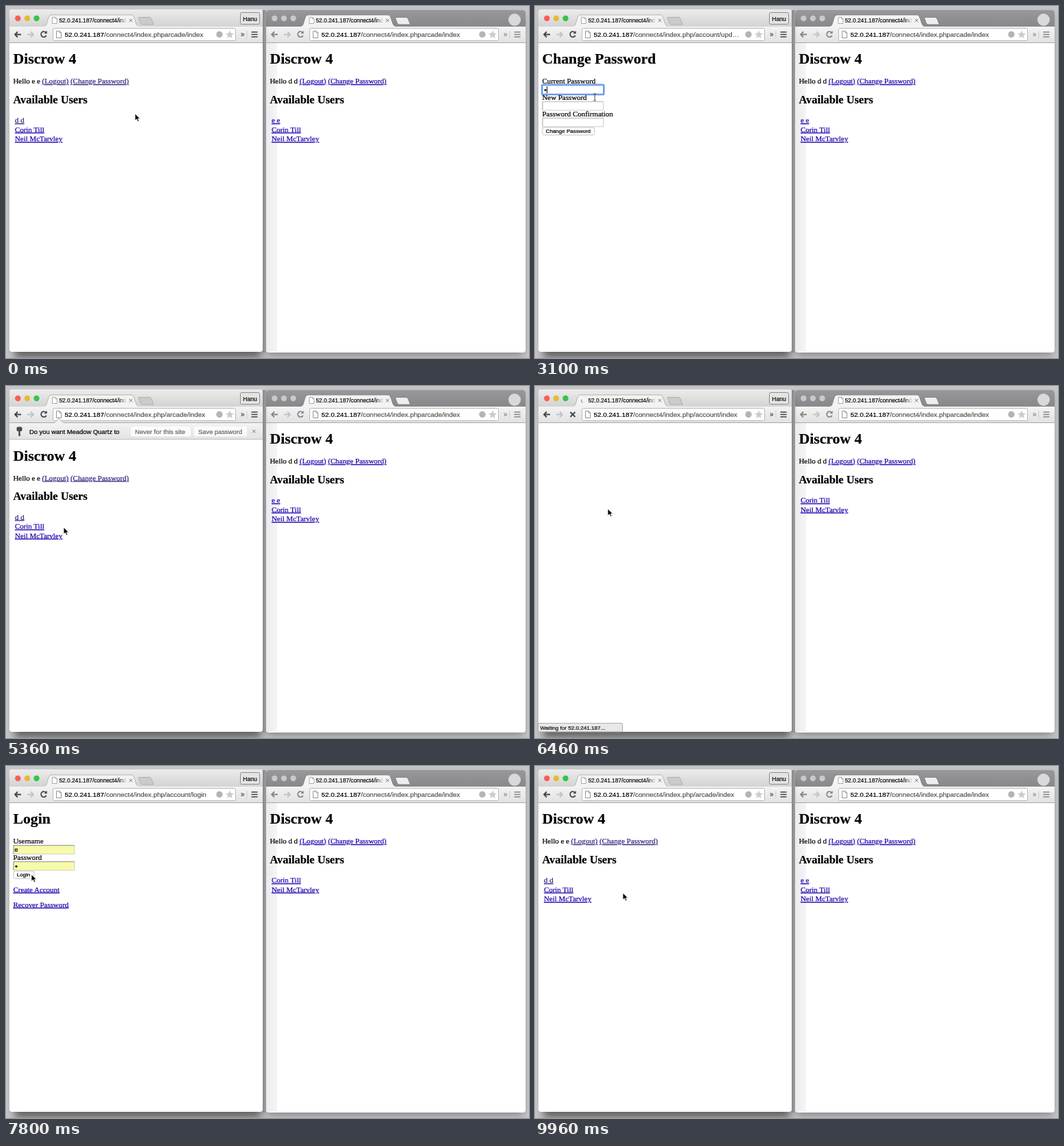
An HTML page for the animation above (10 s loop, 762x513 px).

```html
<!DOCTYPE html>
<html lang="en">
<head>
<meta charset="utf-8">
<title>Two browser windows</title>
<style>
html, body { margin: 0; width: 100%; height: 100%; overflow: hidden; background: #c6c6c8; }
svg { display: block; width: 762px; height: 513px; }
text { white-space: pre; stroke-width: .22px; }
.ui { font-family: "Liberation Sans", Arial, sans-serif; }
.doc { font-family: "Liberation Serif", Times, serif; }
.link { text-decoration: underline; }
</style>
</head>
<body>
<svg viewBox="0 0 762 513">
  <defs>
    <linearGradient id="bar" x2="0" y2="1"><stop stop-color="#ececec"/><stop offset="1" stop-color="#d3d3d3"/></linearGradient>
    <linearGradient id="dim" x2="0" y2="1"><stop stop-color="#98989b"/><stop offset="1" stop-color="#88888c"/></linearGradient>
    <linearGradient id="tool" x2="0" y2="1"><stop stop-color="#f3f3f3"/><stop offset="1" stop-color="#e2e2e2"/></linearGradient>
    <linearGradient id="fade"><stop stop-color="#f3f3f3" stop-opacity="0"/><stop offset="1" stop-color="#f3f3f3"/></linearGradient>
    <linearGradient id="spill"><stop stop-color="#ebebee"/><stop offset="1" stop-color="#f5f5f7"/></linearGradient>
    <linearGradient id="gap"><stop stop-color="#88888b"/><stop offset="1" stop-color="#9d9da0"/></linearGradient>
    <filter id="blur" x="-10%" y="-10%" width="120%" height="120%"><feGaussianBlur stdDeviation="6"/></filter>
  </defs>
  <g id="frame"></g>
  <g id="live"></g>
  <g id="arrow"><path d="M0 0v10l2.4-2.2 1.7 3.6 1.7-.8-1.6-3.4h3.2z" stroke="#fff" stroke-width=".8"/></g>
  <g id="beam" fill="none" stroke="#444"><path d="M-2-5q2 0 2 1.500V4q0 1.500-2 1.500M2-5q-2 0-2 1.500M2 5.500q-2 0-2-1.500"/></g>
</svg>
<script>
const LOOP = 10000, RIGHT = 374, WIDER = 383;
const BLUE = '#1d00ac', VISITED = '#33207e';
const $ = id => document.getElementById(id);

const rect = (x, y, w, h, fill, more = '') =>
  `<rect x="${x}" y="${y}" width="${w}" height="${h}" fill="${fill}" ${more}/>`;
const path = (d, more) => `<path d="${d}" ${more}/>`;
const dot = (x, y, r, fill) => `<circle cx="${x}" cy="${y}" r="${r}" fill="${fill}"/>`;
const ink = color => `fill="${color}" stroke="${color}"`;
const ui = (x, y, s, size, color = '#111', more = '') =>
  `<text class="ui" x="${x}" y="${y}" font-size="${size}" ${ink(color)} ${more}>${s}</text>`;
const doc = (x, y, s, size = 10.9, more = '') =>
  `<text class="doc" x="${x}" y="${y}" font-size="${size}" ${ink('#000')} ${more}>${s}</text>`;
const head = (x, y, s, size) => doc(x, y, s, size, 'font-weight="bold"');
const link = (s, color = BLUE) => `<tspan class="link" ${ink(color)}>${s}</tspan>`;
const move = (x, y, s) => `<g transform="translate(${x} ${y})">${s}</g>`;
const line = (d, color, w = 1) => path(d, `fill="none" stroke="${color}" stroke-width="${w}"`);

// Window furniture; dx moves the left parts, ex the parts tied to the right edge.
function chrome(dx, ex, active) {
  const dark = active ? '#444' : '#858585', edge = active ? '#a8a8a8' : '#77777b';
  const lights = active ? ['#fb5d57', '#e9b935', '#34c547'] : ['#c9c9cc', '#c9c9cc', '#c9c9cc'];
  const left = active ? 5 : 379, width = active ? 369 : 378;
  return move(dx, 0,
    lights.map((c, i) => dot(17.3 + i * 13.6, 18, 4.2, c)).join('') +
    path('M56 30C61 29 60 13 66 13H183C188 13 188 29 193.500 30', `fill="#f3f3f3" stroke="${edge}" stroke-width=".8"`) +
    path('M193 16.500H209Q211 16.500 212 19L215 27H199Q197 27 196 25Z',
      `fill="${active ? '#cbcbcb' : '#eeeef0'}" stroke="${edge}" stroke-width=".8"`) +
    ui(77.5, 24, '52.0.241.187/connect4/ind', 8.3) +
    rect(164, 14, 12, 14, 'url(#fade)') + rect(176, 14, 2, 14, '#f3f3f3') +
    line('M179.500 18.700l4.600 4.600m0-4.600l-4.600 4.600', '#777')) +
    rect(left, 30, width, 23.5, 'url(#tool)') + rect(left, 53, width, 1, '#a9a9a9') +
    move(dx, 0, rect(56.5, 29, 136, 2, '#f3f3f3') +
      rect(68.5, 32.5, 266 + ex - dx, 18, '#fff', 'rx="2" stroke="#b9b9b9"') +
      line('M22 41.500H13M17 37.500L13 41.500L17 45.500', dark, 1.8) +
      line('M31 41.500H40M36 37.500L40 41.500L36 45.500', '#c2c2c2', 1.8) +
      path('M73.500 36.500h4.500l2.500 2.500v7.500h-7zM78 36.500v2.500h2.500', 'fill="#fff" stroke="#888" stroke-width=".9"')) +
    move(ex, 0, dot(311, 41.5, 4.7, '#b4b4b4') +
      path('M326 35.500l1.700 4 4.300.4-3.300 2.800 1 4.300-3.700-2.300-3.700 2.300 1-4.300-3.300-2.800 4.300-.4z', 'fill="#cbcbcb"') +
      ui(342, 44.5, '»', 10, dark) + rect(350.5, 36, .8, 11, '#c5c5c5') +
      line('M357.500 38h9M357.500 41.500h9M357.500 45h9', dark, 1.7));
}

const reload = (x, color) => move(x, 0,
  line('M58.300 38.800A4 4 0 1 0 58.700 43', color, 1.7) + path('M59.700 36v4.300h-4.300z', `fill="${color}"`));

const tabIcon = x => path(`M${x} 16.500h4.500l2.300 2.300v6.700h-6.800zM${x + 4.5} 16.500v2.300h2.300`,
  'fill="#fff" stroke="#999" stroke-width=".8"');

$('frame').innerHTML =
  rect(0, 0, 762, 513, '#c6c6c8') +
  rect(380, 12, 374, 497, '#000', 'opacity=".32" filter="url(#blur)"') +
  rect(379, 6, 378, 499, '#fff', 'rx="4"') +
  path('M379 30V10q0-4 4-4H753q4 0 4 4V30z', 'fill="url(#dim)"') +
  chrome(RIGHT, WIDER, false) + dot(741, 20, 9, '#d9d9db') +
  tabIcon(442) + reload(RIGHT, '#858585') +
  rect(12, 18, 360, 495, '#000', 'opacity=".5" filter="url(#blur)"') +
  rect(374, 6, 5, 499, 'url(#gap)') +
  rect(5, 5, 369, 499, '#fff', 'rx="4"') +
  path('M5 30V9q0-4 4-4H370q4 0 4 4V30z', 'fill="url(#bar)"') +
  chrome(0, 0, true) +
  rect(341.5, 9.5, 28, 17, '#e4e4e4', 'rx="2" stroke="#8d8d8d"') +
  ui(355.5, 21.5, 'Hanu', 8.6, '#111', 'text-anchor="middle"');

// Blank page areas, repainted with every change of content.
const paper = rect(5, 54, 369, 448, '#fff') + rect(395, 54, 362, 448, '#fff') + rect(379, 54, 16, 450, 'url(#spill)');

function lobby(me, names, meColor) {
  return head(10.5, 84, 'Discrow 4', 21.7) +
    doc(10.5, 113, `Hello ${me} ${link('(Logout)', meColor)} ${link('(Change Password)', meColor)}`) +
    head(10.5, 141.5, 'Available Users', 16.35) +
    names.map((n, i) => doc(13, 170 + i * 13.5, link(n, n == 'd d' ? VISITED : BLUE))).join('');
}

function field(y, { focus, fill = '#fff', text = '', caret }) {
  return (focus ? rect(10, y - 1, 90.5, 14.5, 'none', 'rx="1.5" stroke="#6f9ff0" stroke-width="2.2"') : '') +
    rect(11, y, 88.5, 12.5, fill, `stroke="${focus ? '#5a8be0' : '#c8c8c8'}" stroke-width=".9"`) +
    (focus ? '' : line(`M11 ${y + 12.5}V${y}H99.500`, fill == '#fff' ? '#b5b5b5' : '#8f8f8f', .9)) +
    (text == '•' ? dot(15, y + 6.8, 1.6, '#111') : ui(12.5, y + 9.5, text, 8.5, '#000')) +
    (caret ? rect(text ? 17 : 12.5, y + 1.5, 1, 10, '#111') : '');
}

const button = (y, w, s) => rect(11, y, w, 11, '#fff', 'rx="2.5" stroke="#bdbdbd" stroke-width=".9"') +
  ui(15.7, y + 8, s, 8, '#000');

function passwordPage(t, caret) {
  const focus = step([[0, -1], [2040, 0], [3320, 1], [4420, 2]], t);
  const typed = [2720, 3940, 4680];
  const labels = ['Current Password', 'New Password', 'Password Confirmation'];
  return head(10.5, 84, 'Change Password', 21.7) +
    labels.map((s, i) => doc(10.5, 113 + i * 23.8, s) +
      field(115.7 + i * 23.8, { focus: focus == i, text: t >= typed[i] ? '•' : '', caret: focus == i && caret })).join('') +
    button(177, 75.5, 'Change Password');
}

function loginPage(t, caret) {
  const focus = t >= 8320 && t < 9300, empty = t >= 8460 && t < 8760;
  const yellow = '#f7fba8';
  return head(10.5, 84, 'Login', 21.7) +
    doc(10.5, 113, 'Username') + field(115.7, { fill: yellow, text: 'e' }) +
    doc(10.5, 136.8, 'Password') +
    field(139.5, { fill: t < 8460 ? yellow : '#fff', text: empty ? '' : '•', focus, caret: focus && caret }) +
    button(153, 30, 'Login') +
    doc(10.5, 183.5, link('Create Account')) + doc(10.5, 205.5, link('Recover Password'));
}

function infobar(h) {
  const pill = (x, w, s) => rect(x, 59, w, 14.5, '#fbfbfb', 'rx="2"') + ui(x + 6, 69.7, s, 9.4, '#666');
  return `<svg x="0" y="47" width="374" height="${h + 7}" viewBox="0 47 374 ${h + 7}">` +
    move(0, h - 24.5, rect(5, 54, 369, 24, 'url(#tool)') + rect(5, 77.5, 369, 1, '#b0b0b0') +
      rect(15.5, 59.5, 8, 6.5, '#4a4a4a', 'rx="2"') + rect(18.3, 64, 2.5, 9, '#4a4a4a') +
      ui(34, 69.7, 'Do you want Meadow Quartz to', 9.4, '#000') +
      pill(182, 87, 'Never for this site') + pill(274, 77, 'Save password') +
      line('M359 63.700l4.600 4.600m0-4.600l-4.600 4.600', '#777')) +
    path('M70 54L77 47.500L84 54', 'fill="#f1f1f1" stroke="#aaa" stroke-width=".8"') + '</svg>';
}

const bubble = s => s && rect(4.5, 491.5, 123, 12.5, '#e8e8e8', 'rx="1.5" stroke="#a5a5a5" stroke-width=".9"') +
  ui(7.5, 500.5, s, 8.1);

// Last value whose start time has passed.
const step = (list, t) => list.filter(k => k[0] <= t).pop()[1];

const pages = [[0, 'lobby'], [1500, 'password'], [5100, 'lobby'], [6300, 'blank'], [6760, 'login'], [9480, 'lobby']];
const urls = [[0, 'arcade/index'], [1500, '/account/upd…'], [5100, '/arcade/index'],
  [6300, '/account/index'], [6760, '/account/login'], [9480, '/arcade/index']];
const hover = '52.0.241.187/connect4/ind…', waiting = 'Waiting for 52.0.241.187...';
const notes = [[0, ''], [820, hover], [1240, waiting], [1500, ''], [6060, hover], [6280, waiting], [6760, '']];
const busy = [[0, 0], [1240, 1], [1500, 0], [4960, 1], [5140, 0], [6220, 1], [6780, 0],
  [7980, 1], [8080, 0], [9320, 1], [9500, 0]];

// Pointer stops: time, x, y.
const stops = [[0, 188, 157], [660, 188, 157], [860, 128, 108], [1400, 128, 108], [1660, 128, 123],
  [2040, 88, 122], [2920, 88, 122], [3300, 86, 145], [4060, 86, 145], [4320, 87, 167], [4720, 87, 168],
  [4900, 62, 182], [5000, 62, 182], [5360, 84, 206], [5820, 84, 206], [6080, 72, 133], [6240, 72, 133],
  [6460, 106, 179], [6840, 106, 179], [7300, 62, 192], [7780, 37, 158], [7980, 37, 158], [8300, 60, 146],
  [8840, 60, 146], [9120, 35, 158], [9340, 35, 158], [9820, 130, 188], [9940, 130, 188],
  [9960, 128, 185], [LOOP, 128, 185]];

const clamp = v => Math.max(0, Math.min(1, v));

function pointer(t) {
  const i = stops.findIndex(s => s[0] > t), [t0, x0, y0] = stops[i - 1], [t1, x1, y1] = stops[i];
  const p = (t - t0) / (t1 - t0), k = p * p * (3 - 2 * p);
  return [x0 + (x1 - x0) * k, y0 + (y1 - y0) * k];
}

function scene(t) {
  const page = step(pages, t), caret = Math.floor((t - 2020) / 240) % 2 == 0;
  const bar = 24.5 * (clamp((t - 5140) / 120) - clamp((t - 6200) / 80));
  const others = ['Corin Till', 'Neil McTarvley'];
  const body = {
    lobby: () => lobby('e e', ['d d', ...others], VISITED),
    password: () => passwordPage(t, caret),
    login: () => loginPage(t, caret),
    blank: () => ''
  }[page]();
  const online = t < 6400 || t >= 9700 ? ['e e', ...others] : others;
  const url = (x, s) => ui(x, 45, `52.0.241.187<tspan ${ink('#555')}>/connect4/index.php${s}</tspan>`, 9.85, '#000');
  const loading = step(busy, t), spin = Math.floor(t / 20) * 14 % 360;
  return paper + url(85.5, step(urls, t)) + url(459.5, 'arcade/index') +
    (loading
      ? `<g transform="rotate(${spin} 71 21)">${line('M71 17.500a3.500 3.500 0 0 1 3.500 3.500', '#7d85cc', 1.2)}</g>` +
        line('M51.500 38l7 7m0-7l-7 7', '#444', 1.9)
      : tabIcon(67.5) + reload(0, '#444')) +
    move(0, bar, body) + move(RIGHT, 0, lobby('d d', online, BLUE)) +
    (bar > 0 ? infobar(bar) : '') + bubble(step(notes, t));
}

let shown;
function draw(now) {
  const t = now % LOOP, markup = scene(t), [x, y] = pointer(t), page = step(pages, t);
  if (markup !== shown) $('live').innerHTML = shown = markup;
  const overField = x < 100 && (page == 'password' && y > 114 && y < 176 || page == 'login' && y > 139 && y < 152);
  for (const id of ['arrow', 'beam']) {
    $(id).setAttribute('transform', `translate(${x} ${y})`);
    $(id).style.display = (id == 'beam') == overField ? '' : 'none';
  }
}

const start = performance.now();
(function tick() {
  draw(performance.now() - start);
  requestAnimationFrame(tick);
})();
</script>
</body>
</html>
```
